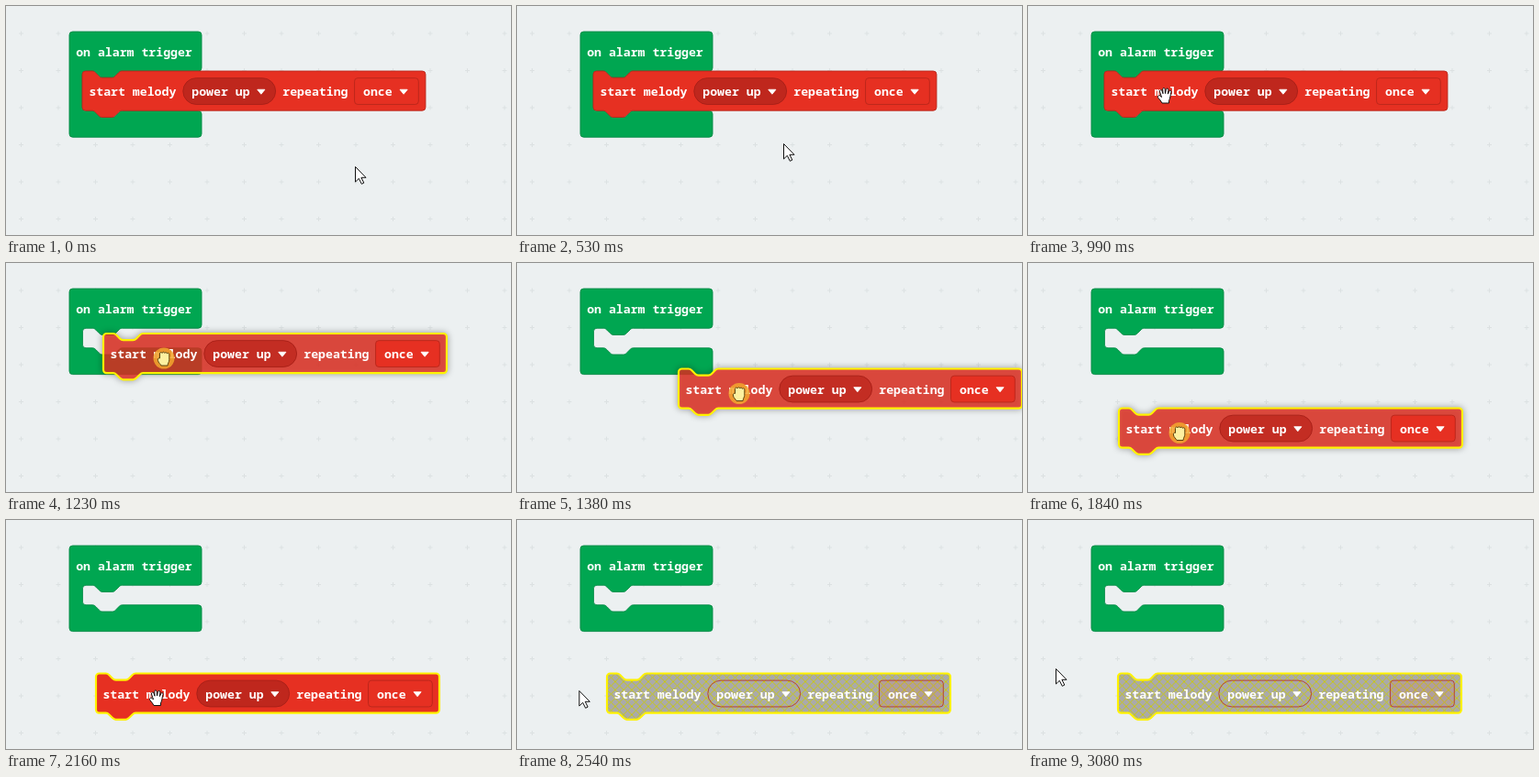
An HTML page that plays this animation: 550x250 px, repeating every 3860 ms.

```html
<!DOCTYPE html>
<html lang="en">
<head>
<meta charset="utf-8">
<title>Dragging a block out</title>
<style>
  html, body { margin: 0; width: 100%; height: 100%; overflow: hidden; background: #ecf0f1; }
  svg { display: block; }
  text { font: 700 14.67px "Noto Sans Mono", "DejaVu Sans Mono", monospace; fill: #fff; }
  #event { fill: #00a651; stroke: #008a44; }
  #shape, #once { fill: #e63022; stroke: #b8261b; }
  #pill { fill: #bf271d; stroke: #a82018; }
  .arrow { fill: #fff; stroke: #fff; stroke-linejoin: round; }
  .selected #shape { stroke: #fff200; stroke-width: 2.4; }
  .dragging #shape { fill-opacity: .8; filter: drop-shadow(0 0 4px rgba(0, 0, 0, .4)); }
  .dragging #pill { fill-opacity: .8; }
  .disabled #shape { fill: url(#hatch); }
  .disabled #pill { fill: none; stroke: #b8382b; }
  .disabled #once { fill-opacity: .1; stroke: #b8382b; }
  #cursor path { fill: #fff; stroke: #111; stroke-linejoin: round; }
  #cursor #fist { fill: #fdf0a0; stroke: #5a4310; }
</style>
</head>
<body>
<svg width="550" height="250" viewBox="0 0 550 250">
  <defs>
    <pattern id="grid" x="-3.75" y="9.75" width="40.5" height="40.5" patternUnits="userSpaceOnUse">
      <path d="M17.75 20.25h5M20.25 17.75v5" stroke="#dce1e2"/>
    </pattern>
    <pattern id="hatch" width="10" height="10" patternUnits="userSpaceOnUse">
      <path d="M0 0h10v10H0z" fill="#aaa"/>
      <path d="M0 0L10 10M10 0L0 10" stroke="#cc0"/>
    </pattern>
  </defs>
  <rect width="550" height="250" fill="url(#grid)"/>
  <g transform="translate(69 28) scale(.9)">
    <path id="event"/>
    <text x="8" y="30">on alarm trigger</text>
  </g>
  <g id="block">
    <path id="shape"/>
    <text x="8.2" y="30.5">start melody</text>
    <rect id="pill" x="122" y="8.5" width="112" height="32" rx="16"/>
    <text x="132.5" y="30.5">power up</text>
    <path class="arrow" d="M212 22.5h9l-4.5 5.5z"/>
    <text x="242.5" y="30.5">repeating</text>
    <rect id="once" x="329.5" y="8.5" width="77.5" height="32" rx="4"/>
    <text x="340" y="30.5">once</text>
    <path class="arrow" d="M384.5 22.5h9l-4.5 5.5z"/>
  </g>
  <g id="cursor">
    <circle id="halo" r="11.5" fill="#f2a72e" fill-opacity=".85"/>
    <path id="pointer" d="M.5 .5v16.5l3.8-3.7 3 6 2.5-1.2-2.9-5.8h5.1z"/>
    <path id="hand" d="M-3 8c-1-2-2.5-4-4-5.5c-1.5-2 .5-3.5 2-2.5l1.5 1.5L-5.5-4.5c-.5-2 2-2.5 2.5-.8l1 3-.3-4.7c0-2 2.4-2 2.5 0l.3 4.5 .9-4.3c.4-1.8 2.7-1.4 2.5 .4l-.5 4.5 1.3-3c.7-1.6 2.8-.8 2.3 .8c-1 3-1 7-2.5 9.5v2.6z"/>
    <path id="fist" d="M-3 8c-1-2-3-3-3.5-5.5c-.5-2 .5-3 2-2.5v-5c0-1.8 2-2 2.6-.6c.3-1.6 2.4-1.6 2.7 0c.4-1.2 2.4-1 2.6 .4c.6-1 2.4-.6 2.4 1v6c0 2-1.5 3.5-1.8 6.2z"/>
  </g>
</svg>
<script>
const LOOP = 3860, STEP = 77.1, GRAB = [149, 98];
const PRESS = 14, DETACH = 15, DROP = 28;
const $ = id => document.getElementById(id);

// Cursor path: step, x, y
const path = [
  [4, 380, 175], [5, 377, 177], [6, 345, 171], [7, 290, 150], [8, 230, 125],
  [9, 185, 108], [10, 160, 100], [11, ...GRAB], [14, ...GRAB],
  [15, 153, 96], [16, 172, 104], [17, 210, 124], [18, 242, 142.5],
  [19, 244, 155], [20, 229, 167.5], [22, 186, 181], [24, 165, 185.5],
  [26, 164, 194.5], [28, 164, 194.5], [29, 160, 195], [30, 146, 194],
  [31, 120, 192], [34, 41, 183], [35, 34, 174], [36, 31, 167],
  [37, 30, 164], [38, 30, 164], [40, 30, 162]
];

function cursorAt(k) {
  const i = path.findIndex(p => p[0] >= k);
  if (i < 0) return path.at(-1).slice(1);
  if (i === 0) return path[0].slice(1);
  const [a, ax, ay] = path[i - 1], [b, bx, by] = path[i];
  const f = (k - a) / (b - a);
  return [ax + (bx - ax) * f, ay + (by - ay) * f];
}

const notch = s => `c${2 * s} 0 ${3 * s} 1 ${4 * s} 2l${4 * s} 4c${s} 1 ${2 * s} 2 ${4 * s} 2` +
  `h${12 * s}c${2 * s} 0 ${3 * s} -1 ${4 * s} -2l${4 * s} -4c${s} -1 ${2 * s} -2 ${4 * s} -2`;
const turn = (x, y, sweep = 1) => `a4 4 0 0 ${sweep} ${x} ${y}`;

const eventPath = gap =>
  `M0 4${turn(4, -4)}H156${turn(4, 4)}V44${turn(-4, 4)}H64${notch(-1)}H20${turn(-4, 4, 0)}` +
  `V${44 + gap}${turn(4, 4, 0)}H28${notch(1)}H156${turn(4, 4)}V${76 + gap}${turn(-4, 4)}H4${turn(-4, -4)}z`;

$("shape").setAttribute("d",
  `M0 4${turn(4, -4)}H12${notch(1)}H411.5${turn(4, 4)}V44${turn(-4, 4)}H48${notch(-1)}H4${turn(-4, -4)}z`);

const show = (id, on) => $(id).setAttribute("visibility", on ? "visible" : "hidden");

function draw(t) {
  const k = Math.floor((t % LOOP + 13) / STEP);
  const [x, y] = cursorAt(k);
  const [heldX, heldY] = cursorAt(Math.min(k, DROP));
  const moved = k >= DETACH;
  const bx = 83 + (moved ? heldX - GRAB[0] : 0);
  const by = 71 + (moved ? heldY - GRAB[1] : 0);
  const pressed = k >= PRESS && k < DROP;
  const over = x > bx && x < bx + 374 && y > by && y < by + 44;

  $("event").setAttribute("d", eventPath(moved ? 24 : 48));
  $("block").setAttribute("transform", `translate(${bx} ${by}) scale(.9)`);
  $("block").setAttribute("class", [
    k >= PRESS && "selected", moved && pressed && "dragging", k > DROP && "disabled"
  ].filter(Boolean).join(" "));
  $("cursor").setAttribute("transform", `translate(${x} ${y})`);
  show("halo", pressed);
  show("fist", pressed);
  show("hand", over && !pressed);
  show("pointer", !over && !pressed);
}

const start = performance.now();
function tick() {
  draw(performance.now() - start);
  requestAnimationFrame(tick);
}
tick();
</script>
</body>
</html>
```
